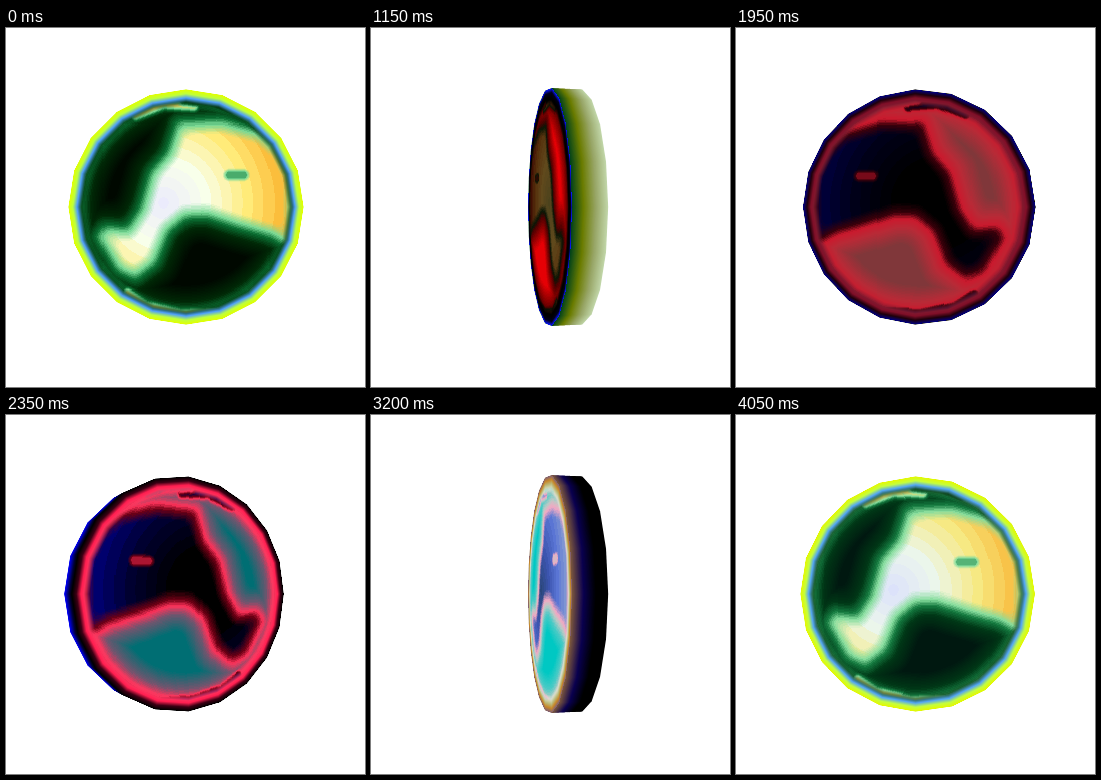
Animation of 359 by 359 pixels, one loop 4.1 s. Source, as an HTML page with a canvas:

```html
<!DOCTYPE html>
<html lang="en">
<head>
<meta charset="utf-8">
<title>Spinning disc</title>
<style>
html, body { margin: 0; width: 100%; height: 100%; overflow: hidden; background: #fff; }
canvas { display: block; }
</style>
</head>
<body>
<canvas id="stage" width="359" height="359"></canvas>
<script>
const SIZE = 359, CX = 180, CY = 179;
const R = 116, FRONT = 6, BACK = -23, CAMERA = 500, SIDES = 20;
const LOOP = 4100, STEP = 50;

// Colour keys: relief core to edge, light area centre to side, face border, rim front to back.
const KEYS = [
  [0, '000800 002806 0a6e32 78d996', 'ebebfc f8ffeb ffeb78 faaf28', '053c14 50a0fa beff3c e1ff00', 'd2ff00 d2ff00 d2ff00 d2ff00'],
  [700, 'c8000a 000000 000000 0a2d0a', 'a08c3c cd9b3c b46418 780a00', '000000 000000 00003c 1432ff', '008c3c d7fa00 ffffbe f0f0ff'],
  [1550, 'ff0000 ff0000 960000 080000', '000000 000000 000000 000000', '000000 000000 000000 0000ff', '000000 0a0c00 3c5519 96be5a'],
  [2350, '006e73 6e556e ff325a 6e0014', '000000 000000 000030 000082', 'ff3c64 ff1e50 3c0014 000000', '000000 00003c 0000a0 0000ff'],
  [2800, '00e6e6 96d7e6 ffb4d7 eb5aaa', '00000a 000064 0a14d2 2846f0', 'ffd7eb ff963c 961e00 0000eb', '000078 000000 000000 000000'],
  [3600, '00aaa0 00bea5 6ee1b4 fafadc', '558ceb 78aafa aad7d7 ebf8b4', 'c8f5be 78e1be faf050 ffbe00', 'ffb400 1400a0 000000 000000']
].map(([at, ...ramps]) => ({ at, ramps: ramps.map(r => r.split(' ').map(rgb)) }));

const LAND = [[172,95],[215,93],[255,104],[275,122],[288,150],[288,222],[262,207],[230,198],
  [200,188],[180,189],[163,203],[150,235],[130,250],[112,242],[92,208],[100,198],[122,200],
  [135,180],[145,145],[162,125]];
const LIGHT_ARCS = [
  [[130,89],[158,78],[187,80]],
  [[122,264],[140,276],[175,284],[208,283]]
];
const DARK_ARC = [[180,71],[205,74],[225,82]];
const BAR = [[223,147.5],[237,147.5]];

const ctx = document.getElementById('stage').getContext('2d');
const layer = document.createElement('canvas');
layer.width = layer.height = SIZE;
const layerCtx = layer.getContext('2d');
const image = layerCtx.createImageData(SIZE, SIZE);

function rgb(hex) {
  const n = parseInt(hex, 16);
  return [n >> 16, n >> 8 & 255, n & 255];
}
function clamp(v, lo = 0, hi = 1) { return Math.min(hi, Math.max(lo, v)); }
function mix(a, b, k) {
  return [a[0] + (b[0] - a[0]) * k, a[1] + (b[1] - a[1]) * k, a[2] + (b[2] - a[2]) * k];
}
function ramp(colors, stops, v) {
  let i = 0;
  while (i < stops.length - 2 && v > stops[i + 1]) i++;
  return mix(colors[i], colors[i + 1], clamp((v - stops[i]) / (stops[i + 1] - stops[i])));
}

function segDist(x, y, [ax, ay], [bx, by]) {
  const dx = bx - ax, dy = by - ay;
  const k = clamp(((x - ax) * dx + (y - ay) * dy) / (dx * dx + dy * dy));
  return Math.hypot(x - ax - k * dx, y - ay - k * dy);
}
function pathDist(x, y, pts) {
  let d = Infinity;
  for (let i = 1; i < pts.length; i++) d = Math.min(d, segDist(x, y, pts[i - 1], pts[i]));
  return d;
}
// Distance to the light area's outline, positive inside.
function landDist(x, y) {
  let inside = false, d = Infinity;
  LAND.forEach((a, i) => {
    const b = LAND[(i + 1) % LAND.length];
    d = Math.min(d, segDist(x, y, a, b));
    if (a[1] > y !== b[1] > y && x < (b[0] - a[0]) * (y - a[1]) / (b[1] - a[1]) + a[0]) inside = !inside;
  });
  return inside ? d : -d;
}
function level(x, y) {
  let sum = 0;
  for (const [dx, dy] of [[0,0],[5,0],[-5,0],[0,5],[0,-5]]) sum += landDist(x + dx, y + dy);
  let v = sum / 5;
  v = Math.max(v, -Math.max(0, 0.9 * R - Math.hypot(x - CX, y - CY)));
  for (const arc of LIGHT_ARCS) v = Math.max(v, (4.5 - pathDist(x, y, arc)) * 3);
  v = Math.min(v, (pathDist(x, y, DARK_ARC) - 7) * 3);
  return Math.min(v, Math.max(1, (pathDist(x, y, BAR) - 2.5) * 3));
}

const relief = new Float32Array(SIZE * SIZE);
for (let y = 0; y < SIZE; y++)
  for (let x = 0; x < SIZE; x++)
    if (Math.hypot(x - CX, y - CY) < R + 2) relief[y * SIZE + x] = level(x, y);

function paletteAt(t) {
  let i = KEYS.length - 1;
  while (KEYS[i].at > t) i--;
  const a = KEYS[i], b = KEYS[(i + 1) % KEYS.length];
  const k = (t - a.at) / ((b.at || LOOP) - a.at);
  return a.ramps.map((r, n) => r.map((c, j) => mix(c, b.ramps[n][j], k)));
}

const THIRDS = [0, 0.33, 0.67, 1];
const RELIEF_STOPS = [-27, -11, -2, 4];
const BORDER_STOPS = [0.89, 0.93, 0.965, 1];

function drawRim(colors, c, s) {
  const n = 48;
  for (let i = n; i >= 0; i--) {
    const z = FRONT + (BACK - FRONT) * i / n;
    ctx.beginPath();
    for (let j = 0; j < SIDES; j++) {
      const a = j * 2 * Math.PI / SIDES;
      const x = R * Math.cos(a), y = R * Math.sin(a);
      const scale = CAMERA / (CAMERA + x * s - z * c);
      ctx.lineTo(CX + (x * c + z * s) * scale, CY + y * scale);
    }
    ctx.fillStyle = `rgb(${ramp(colors, THIRDS, i / n).map(Math.round)})`;
    ctx.fill();
  }
}

// Casts each pixel back onto the front plane of the disc.
function drawFace([dark, light, border], c, s, flip) {
  const data = image.data, wedge = 2 * Math.PI / SIDES;
  const gap = CAMERA - FRONT * c;
  data.fill(0);
  for (let py = 55; py < 305; py++) {
    for (let px = 50; px < 310; px++) {
      const sx = px + 0.5 - CX, sy = py + 0.5 - CY;
      const div = c * CAMERA - sx * s;
      if (div <= 0) continue;
      const x = (sx * gap - FRONT * s * CAMERA) / div;
      if (Math.abs(x) > R + 2) continue;
      const y = sy * (gap + x * s) / CAMERA;
      const a = (Math.atan2(y, x) + 2 * Math.PI) % wedge - wedge / 2;
      const r = Math.hypot(x, y) / R * Math.cos(a) / Math.cos(wedge / 2);
      if (r > 1) continue;

      const u = Math.round(CX + x * flip), v = Math.round(CY + y);
      const h = Math.round(relief[v * SIZE + u] / 1.5) * 1.5;
      let color = ramp(dark, RELIEF_STOPS, h);
      if (h > 4) {
        const far = Math.hypot(u - 158, v - 175) / 125;
        color = mix(color, ramp(light, THIRDS, Math.round(far * 12) / 12), clamp((h - 4) / 9));
      }
      if (r > 0.86) color = mix(color, ramp(border, BORDER_STOPS, r), clamp((r - 0.86) / 0.05));

      const o = (py * SIZE + px) * 4;
      data[o] = color[0];
      data[o + 1] = color[1];
      data[o + 2] = color[2];
      data[o + 3] = 255;
    }
  }
  layerCtx.putImageData(image, 0, 0);
  ctx.drawImage(layer, 0, 0);
}

function draw(t) {
  const turn = t / LOOP * 2 * Math.PI;
  const flip = Math.cos(turn) < 0 ? -1 : 1;
  const c = Math.cos(turn) * flip, s = Math.sin(turn) * flip;
  const palette = paletteAt(t);
  ctx.fillStyle = '#fff';
  ctx.fillRect(0, 0, SIZE, SIZE);
  drawRim(palette[3], c, s);
  drawFace(palette, c, s, flip);
}

const start = performance.now();
let shown = -1;
function tick() {
  const t = Math.floor((performance.now() - start) % LOOP / STEP) * STEP;
  if (t !== shown) draw(shown = t);
  requestAnimationFrame(tick);
}
tick();
</script>
</body>
</html>
```
